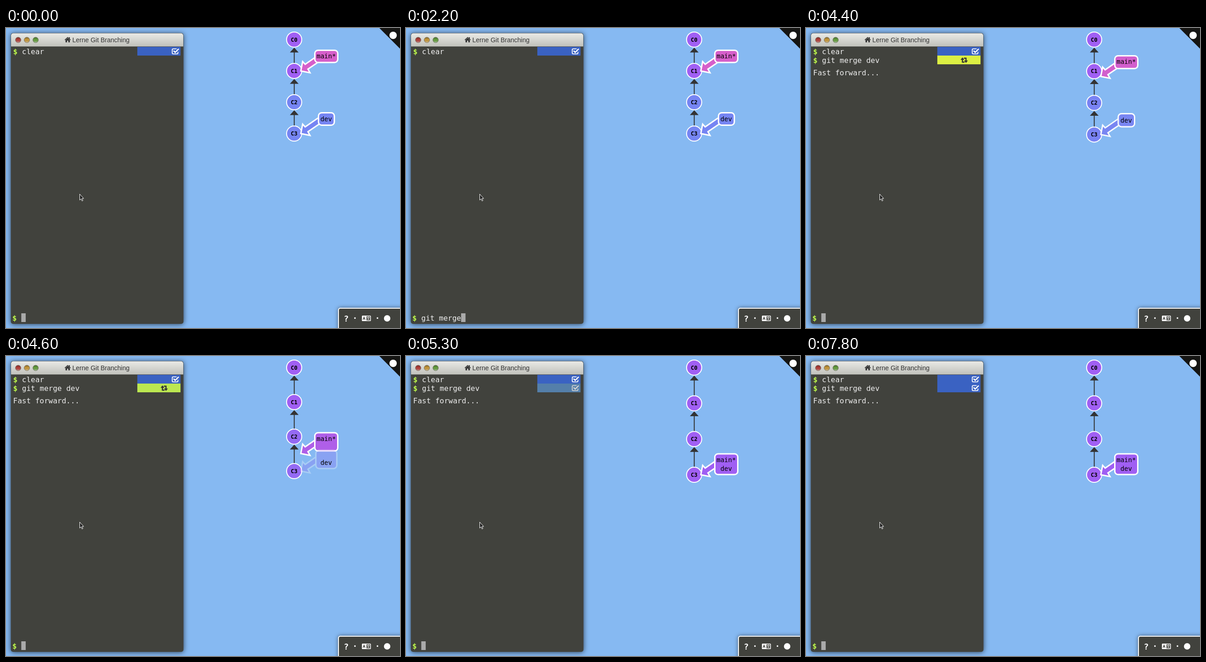
Recreate the animation shown at these times as an HTML page. Size 858 px wide and 653 px high, loop 8 s.

```html
<!DOCTYPE html>
<html lang="de">
<head>
<meta charset="utf-8">
<title>Lerne Git Branching</title>
<style>
  html, body { margin: 0; width: 100%; height: 100%; overflow: hidden; background: #86b9f2; }
  svg { display: block; }
  text { white-space: pre; }
  .term { font: 16px "DejaVu Sans Mono", monospace; fill: #eee; }
  .prompt { font-weight: bold; fill: #bdf94b; }
  .title { font: 14px "Liberation Sans", Arial, sans-serif; fill: #333; }
  .commit { font: bold 12px "DejaVu Sans Mono", monospace; text-anchor: middle; }
  .label { font: 14px "DejaVu Sans Mono", monospace; text-anchor: middle; }
  .tools { font: bold 18px "DejaVu Sans Mono", monospace; fill: #fff; text-anchor: middle; }
  .flag { stroke: #fff; stroke-width: 3; }
  .window { filter: drop-shadow(0 1px 6px rgba(0, 0, 0, .65)); }
  .panel { filter: drop-shadow(0 0 4px rgba(0, 0, 0, .5)); }
</style>
</head>
<body>
<svg width="858" height="653" viewBox="0 0 858 653">
  <defs>
    <linearGradient id="bar" x2="0" y2="1">
      <stop stop-color="#eaeae6"/><stop offset="1" stop-color="#c0c1bb"/>
    </linearGradient>
    <linearGradient id="shine" x2="0" y2="1">
      <stop stop-color="#000" stop-opacity=".4"/>
      <stop offset=".45" stop-color="#000" stop-opacity=".08"/>
      <stop offset="1" stop-color="#fff" stop-opacity=".5"/>
    </linearGradient>
    <g id="check" fill="none" stroke="currentColor">
      <path d="M371.5 45.3H364a2 2 0 0 0-2 2v7a2 2 0 0 0 2 2h8.5a2 2 0 0 0 2-2v-2.6" stroke-width="1.8"/>
      <path d="M364.8 49.3l3.7 3.7 7.6-7.6" stroke-width="2.6"/>
    </g>
  </defs>
  <rect width="858" height="653" fill="#86b9f2"/>

  <g class="window">
    <rect x="10.5" y="11" width="376" height="633" rx="5" fill="#41423d"/>
  </g>
  <path d="M11 40V16.500a5 5 0 0 1 5-5h365a5 5 0 0 1 5 5V40z" fill="url(#bar)"/>
  <path d="M11 40.500h375" stroke="#5c5d58"/>
  <g id="buttons"></g>
  <path d="M127.600 25.600l6.700-6.100 2.700 2.400v-1.900h2v3.700l2.100 1.900-1 1.100-5.800-5.200-5.700 5.200zM129.600 26.300l4.700-4.200 4.700 4.200v4.900h-3.300v-3.700h-2.800v3.700h-3.300z" fill="#333"/>
  <text class="title" x="144.500" y="30.500">Lerne Git Branching</text>

  <rect x="286" y="41" width="94" height="19" fill="#3a62c2"/>
  <use href="#check" color="#fff"/>
  <text class="term prompt" x="15.500" y="56.500">$</text>
  <text class="term" x="34.800" y="56.500">clear</text>

  <g id="entry">
    <rect id="status" x="286" y="60" width="94" height="19"/>
    <text class="term prompt" x="15.500" y="75.500">$</text>
    <text class="term" x="34.800" y="75.500">git merge dev</text>
    <rect id="queued" x="313" y="64.500" width="12" height="10" rx="1.500" fill="none" stroke="#333" stroke-width="1.800"/>
    <g id="working" fill="#333">
      <path d="M340.700 67v7.200h4.600M343.800 65.800h4.600V72" fill="none" stroke="#333" stroke-width="2.500"/>
      <path d="M336.500 69.300l4.200-5.300 4.200 5.300zM344.200 70.700h8.400l-4.200 5.300z"/>
    </g>
    <use id="done" href="#check" y="19"/>
  </g>
  <text id="reply" class="term" x="15.500" y="102.500">Fast forward...</text>

  <text class="term prompt" x="13.800" y="637">$</text>
  <text id="typed" class="term" x="33.300" y="637"></text>
  <rect id="caret" y="621" width="9.600" height="19" fill="#aaa"/>
  <path d="M160.500 361.500v13l3-2.600 2 4.600 2-.9-2-4.500h3.700z" fill="#222" stroke="#fff" stroke-width="1"/>

  <g id="tree"></g>

  <path d="M813 0h45v45z" fill="#151513"/>
  <circle cx="843" cy="16" r="8" fill="#fff"/>

  <g class="panel">
    <path d="M724 660V614a4 4 0 0 1 4-4h140v50z" fill="#41423d" stroke="#fff" stroke-width="2"/>
  </g>
  <g class="tools">
    <text x="741" y="638.500">?</text>
    <text x="760" y="638">·</text>
    <text x="809" y="638">·</text>
  </g>
  <rect x="775" y="626" width="19.500" height="12" rx="1.500" fill="#fff"/>
  <path d="M785 627.500h8v9h-8z" fill="#41423d"/>
  <path d="M777.300 635l2.400-6 2.400 6M778.200 633h3" fill="none" stroke="#41423d" stroke-width="1.300"/>
  <path d="M786 629.800h6M789 628.300v1.500M791 630c-.5 2.500-2.500 4.500-4.500 5.300M787 630c.5 2.500 2.500 4.500 4.500 5.300" fill="none" stroke="#fff"/>
  <circle cx="830" cy="632" r="7" fill="#fff"/>
</svg>
<script>
const LOOP = 8000, TICK = 100, CHAR = 16 * 0.602;
const COMMAND = 'git merge dev';
// [time, characters typed]
const KEYS = [[0, 0], [500, 1], [1000, 3], [1100, 4], [1500, 5], [1900, 6], [2000, 7],
  [2200, 9], [2300, 10], [2500, 11], [2600, 12], [2800, 13], [4000, 0]];
const ENTER = 4000, WORK = 4300, MOVE = 4315, DONE = 4750, SETTLE = 4970;

const YELLOW = [230, 241, 62], GREEN = [172, 227, 89], BLUE = [58, 98, 194];
const PURPLE = [160, 95, 243], INDIGO = [118, 133, 243], PINK = [214, 95, 202];
const DARK = [51, 51, 51], WHITE = [255, 255, 255];

const $ = id => document.getElementById(id);
const lerp = (a, b, p) => a + (b - a) * p;
const mix = (a, b, p) => `rgb(${a.map((v, i) => Math.round(lerp(v, b[i], p)))})`;
const show = (el, on) => { el.style.visibility = on ? 'visible' : 'hidden'; };

function set(el, attrs) {
  for (const key in attrs) el.setAttribute(key, attrs[key]);
  return el;
}

function add(parent, tag, attrs, text = '') {
  const el = set(document.createElementNS('http://www.w3.org/2000/svg', tag), attrs);
  el.textContent = text;
  return parent.appendChild(el);
}

function bezier(x1, y1, x2, y2) {
  const at = (a, b, s) => 3 * a * s * (1 - s) ** 2 + 3 * b * s * s * (1 - s) + s ** 3;
  return x => {
    if (x <= 0 || x >= 1) return x <= 0 ? 0 : 1;
    let lo = 0, hi = 1;
    for (let i = 0; i < 24; i++) {
      const mid = (lo + hi) / 2;
      if (at(x1, x2, mid) < x) lo = mid; else hi = mid;
    }
    return at(y1, y2, lo);
  };
}
const ease = bezier(0.25, 0.1, 0.25, 1);
const easeInOut = bezier(0.42, 0, 0.58, 1);

['#c4453f', '#d9a640', '#6fae45'].forEach((fill, i) => {
  const spot = { cx: 26.5 + 19 * i, cy: 26, r: 6 };
  add($('buttons'), 'circle', { ...spot, fill });
  add($('buttons'), 'circle', { ...spot, fill: 'url(#shine)', stroke: '#77776f' });
});

const tree = $('tree');
const links = [0, 1, 2].map(() => ({
  line: add(tree, 'path', { stroke: '#333', 'stroke-width': 2 }),
  head: add(tree, 'path', { fill: '#333' })
}));
const commits = [0, 1, 2, 3].map(i => ({
  disc: add(tree, 'circle', { cx: 627.5, r: 16.5, stroke: '#fff', 'stroke-width': 2 }),
  name: add(tree, 'text', { class: 'commit', x: 627.5 }, 'C' + i)
}));

// box: [x, y, width, height]; each pair holds start and end
const flags = [
  { name: 'main*', color: PINK, tip: [93.5, 258.5], text: [61.5, 226], opacity: 1,
    box: [[672.5, 48.5, 50, 26.5], [672.5, 213, 50, 45]] },
  { name: 'dev', color: INDIGO, tip: [229.8, 258.5], text: [197.8, 245.5], opacity: 0,
    box: [[680.5, 184.5, 34.5, 27], [672.5, 213, 50, 45]] }
];
for (const flag of flags) {
  flag.group = add(tree, 'g', { class: 'flag' });
  flag.arrow = add(flag.group, 'path', { d: 'M45-39 9.500-14.500 4-20.500 0 0 20 4 15.500-4 45-24z' });
  flag.rect = add(flag.group, 'rect', { rx: 7 });
}
for (const flag of flags) flag.label = add(tree, 'text', { class: 'label', x: 697.3 }, flag.name);

function drawTree(p) {
  const gap = lerp(68.2, 77.8, p), yOf = i => 25.2 + gap * i;
  links.forEach(({ line, head }, i) => {
    const y = yOf(i);
    set(line, { d: `M627.700 ${y + 26}V${yOf(i + 1) - 17}` });
    set(head, { d: `M627.700 ${y + 17.5}l9.500 10.500h-19z` });
  });
  commits.forEach(({ disc, name }, i) => {
    set(disc, { cy: yOf(i), fill: mix(i < 2 ? PURPLE : INDIGO, PURPLE, p) });
    set(name, { y: yOf(i) + 4.3 });
  });
  for (const f of flags) {
    const [x, y, width, height] = f.box[0].map((v, i) => lerp(v, f.box[1][i], p));
    set(f.group, { fill: mix(f.color, PURPLE, p), opacity: lerp(1, f.opacity, p) });
    set(f.arrow, { transform: `translate(642 ${lerp(...f.tip, p)})` });
    set(f.rect, { x, y, width, height });
    set(f.label, { y: lerp(...f.text, p) + 4.7 });
  }
}

function draw(t) {
  const count = KEYS.filter(([at]) => at <= t).pop()[1];
  $('typed').textContent = COMMAND.slice(0, count);
  set($('caret'), { x: 33.3 + count * CHAR });

  show($('entry'), t >= ENTER);
  show($('queued'), t >= ENTER && t < WORK);
  show($('working'), t >= WORK && t < DONE);
  show($('done'), t >= DONE);
  show($('reply'), t >= WORK);

  const settled = ease((t - SETTLE) / 700);
  set($('status'), {
    fill: t < SETTLE ? mix(YELLOW, GREEN, ease((t - WORK) / 700)) : mix(GREEN, BLUE, settled)
  });
  set($('done'), { color: mix(DARK, WHITE, settled) });
  drawTree(easeInOut((t - MOVE) / 450));
}

const start = performance.now();
function frame() {
  const t = (performance.now() - start) % LOOP;
  draw(Math.floor(t / TICK) * TICK);
  requestAnimationFrame(frame);
}
frame();
</script>
</body>
</html>
```
